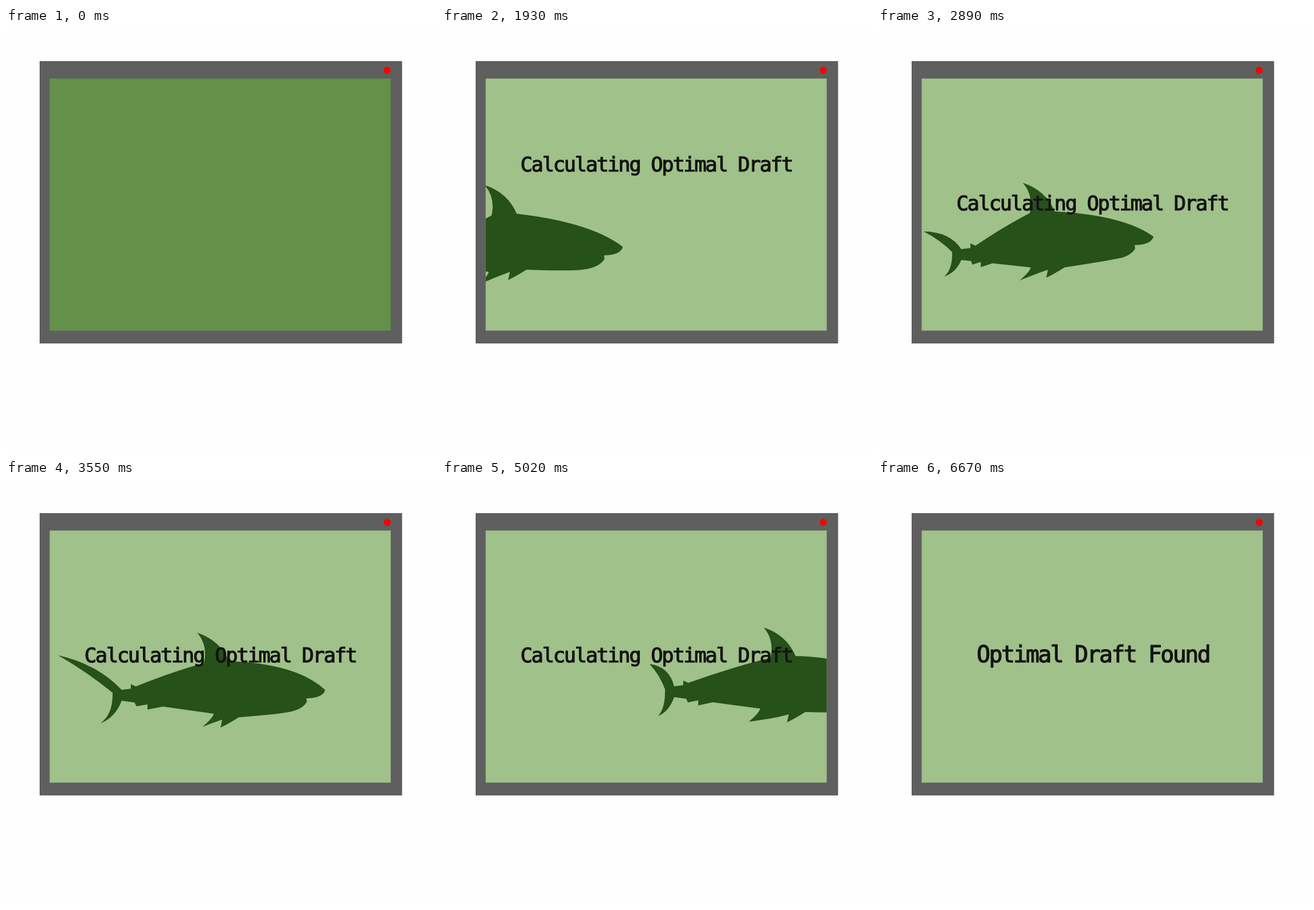
An HTML page that plays this animation: 754 by 742 pixels, repeating every 6730 ms.

```html
<!DOCTYPE html>
<html lang="en">
<head>
<meta charset="utf-8">
<title>Calculating Optimal Draft</title>
<style>
  html, body { margin: 0; width: 100%; height: 100%; overflow: hidden; background: #fefefe; }
  svg { display: block; }
  text {
    font-family: "DejaVu Sans Mono", monospace;
    letter-spacing: -0.065em;
    fill: #141414;
    stroke: #141414;
    stroke-width: 1.2;
  }
</style>
</head>
<body>
<svg width="754" height="742" viewBox="0 0 754 742">
  <clipPath id="glass"><rect x="76.6" y="88.4" width="598" height="441.2"/></clipPath>
  <rect x="59.5" y="58.5" width="634.5" height="493" fill="#5f5f5f" stroke="#575757"/>
  <circle cx="668.5" cy="74" r="6.2" fill="#f00"/>
  <rect id="screen" x="76.6" y="88.4" width="598" height="441.2"/>
  <g clip-path="url(#glass)">
    <path id="shark" fill="#265118"/>
    <text id="busy" x="137.5" font-size="35.5">Calculating Optimal Draft</text>
    <text id="done" x="173" y="319" font-size="40">Optimal Draft Found</text>
  </g>
</svg>
<script>
const LOOP = 6730, STEP = 30;
const [screen, shark, busy, done] =
  ['screen', 'shark', 'busy', 'done'].map(id => document.getElementById(id));

const clamp = (v, lo = 0, hi = 1) => Math.min(hi, Math.max(lo, v));
const lerp = (a, b, k) => a + (b - a) * k;
const mix = (p, q, k) => [lerp(p[0], q[0], k), lerp(p[1], q[1], k)];
const add = (p, x, y) => [p[0] + x, p[1] + y];

// Joints of each pose, relative to the front base of the dorsal fin.
const glide = { nose: [173, 44], root: [-164, 66], upper: [-230, 35], lower: [-194, 114], pec: [-62, 121] };
const sweep = { nose: [167, 52], root: [-196, 45], upper: [-288, -50], lower: [-236, 107], pec: [-42, 113] };
const leave = { nose: [167, 57], root: [-213, 53], upper: [-256, 14], lower: [-241, 105], pec: [-82, 115] };
const enter = { ...glide, nose: [186, 58], pec: [-69, 125] };
const reach = { ...sweep, upper: [-322, -25] };

const swim = [
  { at: 1690, fin: [83, 328], pose: enter },
  { at: 1930, fin: [131, 325], pose: enter },
  { at: 2890, fin: [310, 321], pose: glide },
  { at: 3760, fin: [417, 316], pose: reach },
  { at: 4150, fin: [467, 313], pose: sweep },
  { at: 5020, fin: [620, 308], pose: leave },
  { at: 5680, fin: [736, 297], pose: leave }
];

function outline({ nose, root, upper, lower, pec }) {
  const pt = p => p.map(v => v.toFixed(1)).join(' ');
  const line = (...pts) => 'L' + pts.map(pt).join(' ');
  const curve = (c, p) => `Q${pt(c)} ${pt(p)}`;

  const chin = add(nose, -65, 39);
  const axil = add(pec, 20, -23);
  const under = add(root, 0, 19);
  const fork = add(root, -16, 5);
  const rear = [-44, 3], tip = [-56, -50];
  const belly = (k, drop = 0) => add(mix(under, axil, k), 0, drop);
  const hump = add(root, 25, -6);

  return 'M0 0' +
    // Head: the back droops more when the body is stretched.
    curve([nose[0] * 0.7, (nose[0] - 163) * 0.65], nose) +
    curve(add(nose, -3, 14), add(nose, -33, 15)) +
    line(add(nose, -32, 21)) +
    curve(add(nose, -40, 35), chin) +
    curve(add(chin, -20, 4), [17, 98]) +
    // Pectoral fins and belly.
    curve([-2, 110], [-15, 116]) +
    line([-12, 102]) +
    curve([-30, 108], pec) +
    curve(add(pec, 18, -15), axil) +
    line(belly(0.45), belly(0.28, 9), belly(0.28), belly(0.16, 6), belly(0.14), under) +
    // Tail.
    curve([lerp(under[0], lower[0], 0.3), lerp(under[1], lower[1], 0.75)], lower) +
    curve([fork[0] + 1, lerp(lower[1], fork[1], 0.3)], fork) +
    curve(add(mix(fork, upper, 0.5), 4, -3), upper) +
    curve(add(mix(upper, root, 0.5), 13, -15), root) +
    // Back and dorsal fin.
    line(add(root, 16, -2), add(root, 16, -10), hump) +
    curve(add(mix(hump, rear, 0.5), 0, -4), rear) +
    curve([-37, -28], tip) +
    curve([-16, -37], [0, 0]) + 'Z';
}

function swimTo(t) {
  const i = swim.findIndex(key => key.at > t);
  shark.setAttribute('visibility', i > 0 ? 'visible' : 'hidden');
  if (i < 1) return;
  const from = swim[i - 1], to = swim[i];
  const k = (t - from.at) / (to.at - from.at);
  const pose = {};
  for (const joint in from.pose) pose[joint] = mix(from.pose[joint], to.pose[joint], k);
  shark.setAttribute('d', outline(pose));
  shark.setAttribute('transform', `translate(${mix(from.fin, to.fin, k)})`);
}

function draw(ms) {
  const t = Math.floor((ms % LOOP - 10) / STEP) * STEP + 10;
  const on = t >= 1000;
  screen.setAttribute('fill', on ? '#a0c18a' : '#639149');
  swimTo(t);
  busy.setAttribute('y', Math.min(318.5, 92.5 + (t - 1000) * 0.1707));
  busy.setAttribute('opacity', on && t < 5950 ? 1 : 0);
  done.setAttribute('opacity', clamp((t - 5920) / 720));
}

const start = performance.now();
function tick() {
  draw(performance.now() - start);
  requestAnimationFrame(tick);
}
tick();
</script>
</body>
</html>
```
